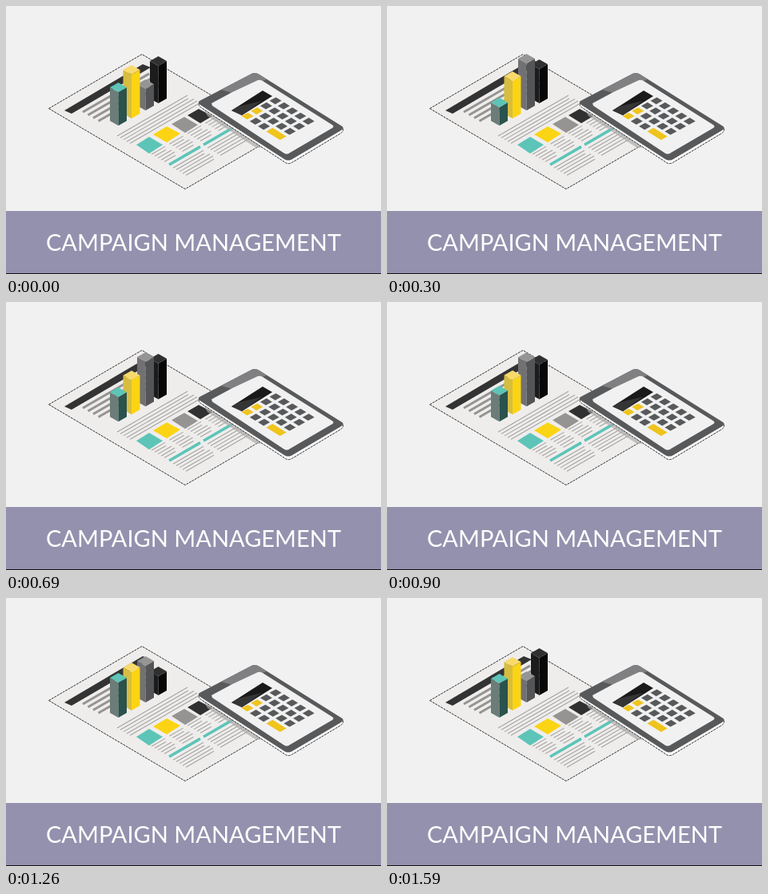
Recreate the animation shown at these times as an HTML page. Size 469x336 px, loop 1.62 s.

```html
<!DOCTYPE html>
<html lang="en">
<head>
<meta charset="utf-8">
<title>Campaign management</title>
<style>
html, body { margin: 0; width: 100%; height: 100%; overflow: hidden; background: #f1f1f1; }
svg { display: block; width: 469px; height: 336px; }
text { font: 29px Lato, "Open Sans", sans-serif; fill: #fff; text-anchor: middle; }
.edge { stroke: #333; stroke-width: 1; stroke-dasharray: 3 1; }
</style>
</head>
<body>
<svg viewBox="0 0 469 336">
  <path class="edge" fill="#efedec" d="M53.5 128.500L170 60.500L341 161.500L224 229.500Z"/>
  <path fill="#333" d="M73 131L171 73L181 77L82 135Z"/>
  <g id="print" fill="none"></g>
  <path fill="#5dc4b8" d="M163 174L179 164L196 174L179 185Z"/>
  <path fill="#fbd414" d="M184 161L201 151L218 160L201 171Z"/>
  <path fill="#959492" d="M207 148L223 139L240 149L224 159Z"/>
  <path fill="#303030" d="M227 137L241 129L258 138L243 147Z"/>
  <path fill="#aaa8a7" opacity=".65" d="M244 124L252 138L313 178L322 177Z"/>
  <path class="edge" fill="#fff" d="M241 122Q241 126 245 128L349 196Q353 199 358 196L418 160Q423 157 421 152L330 110Z"/>
  <path fill="#58595b" d="M242 119L305 86Q311 82 317 86L419 150Q424 153 419 156L358 192Q353 195 348 192L243 124Q239 121 242 119Z"/>
  <path fill="#808082" d="M269 105L305 86Q311 82 317 86L326 92L283 109Z"/>
  <path fill="#f1f1f1" d="M257 122L283 108L315 93Q318 92 321 94L408 149Q411 151 408 153L355 184Q351 187 347 184L258 125Z"/>
  <path fill="#1a1a1a" d="M282 131L321 106L333 113L295 137Z"/>
  <path fill="#353536" d="M282 131L290 126L320 119L295 137Z"/>
  <g id="keys"></g>
  <g id="bars"></g>
  <path fill="#9491ae" d="M0 257H469V335H0Z"/>
  <path fill="#111" d="M0 335H469V336H0Z"/>
  <text x="234.500" y="307">CAMPAIGN MANAGEMENT</text>
</svg>
<script>
const byId = id => document.getElementById(id);
const LOOP = 1620, STEP = 30, SLOPE = 0.58;

function add(parent, attrs) {
  const node = document.createElementNS('http://www.w3.org/2000/svg', 'path');
  for (const name in attrs) node.setAttribute(name, attrs[name]);
  return parent.appendChild(node);
}

// Parallel lines of print, running up to the right and stacked down to the right
function printLines(x, y, length, count, dx, stroke, width) {
  for (let i = 0; i < count; i++) {
    const run = length - (i % 3 === 1 ? 3 : 0);
    add(byId('print'), {
      d: `M${x + i * dx} ${y + i * dx * SLOPE}l${run} ${-run * SLOPE}`,
      stroke, 'stroke-width': width
    });
  }
}
const GRAY = '#a6a4a3', TEAL = '#5dc4b8';
printLines(96, 133, 83, 4, 6.5, '#959492', 3);
printLines(139, 163, 88, 5, 4, GRAY, 1.1);
for (let i = 0; i < 4; i++) printLines(182 + i * 22.5, 186 - i * 13, 17, 5, 4, GRAY, 1.1);
for (let i = 0; i < 2; i++) {
  const x = 204 + i * 43, y = 199 - i * 25;
  printLines(x, y, 39, 1, 0, TEAL, 3.5);
  printLines(x + 5, y + 4, 38, 5, 4, GRAY, 1.1);
}

// Calculator keys, the bottom left one twice as long
for (let row = 0; row < 5; row++) for (let col = 0; col < 4; col++) {
  if (row === 4 && col === 0) continue;
  const wide = row === 3 && col === 0;
  const at = (u, v) => `${302 + u * 11.7 + v * 10.3} ${138 - u * 6.4 + v * 6.4}`;
  const l = col - 0.34, r = col + 0.34, t = row - 0.34, b = row + (wide ? 1.34 : 0.34);
  const yellow = wide || (row === 0 && col < 2);
  add(byId('keys'), {
    d: `M${at(l, t)}L${at(r, t)}L${at(r, b)}L${at(l, b)}Z`,
    fill: yellow ? '#efc41c' : '#58595b'
  });
}

// Each bar: front edge, base, face colours (left, right, top), heights of the top as [ms, y]
const bars = [
  { x: 190.5, base: 122, fill: ['#1c1c1c', '#080808', '#303030'],
    top: [[0, 63], [300, 67], [540, 68], [690, 65], [780, 65], [1050, 71], [1260, 86], [1590, 63]] },
  { x: 174.5, base: 131, fill: ['#717173', '#545557', '#959595'],
    top: [[0, 92], [300, 60], [420, 52], [540, 57], [690, 63], [780, 63], [1050, 64], [1260, 73], [1590, 92]] },
  { x: 157, base: 141, fill: ['#d6bd40', '#fbd414', '#f8da6c'],
    top: [[0, 74], [300, 82], [540, 86], [690, 86], [780, 86], [1050, 85], [1260, 81], [1590, 74]] },
  { x: 140.5, base: 150, fill: ['#6c7c79', '#2b524c', '#5dc4b8'],
    top: [[0, 96], [300, 115], [540, 109], [690, 107], [780, 107], [1050, 100], [1260, 94], [1590, 95]] }
];
for (const bar of bars) bar.faces = bar.fill.map(fill => add(byId('bars'), { fill }));

// Smooth curve through the keys, level at turning points
function curve(keys, t) {
  const n = keys.length;
  const key = i => i < 0 ? [keys[i + n][0] - LOOP, keys[i + n][1]]
    : i < n ? keys[i] : [keys[i - n][0] + LOOP, keys[i - n][1]];
  let i = n - 1;
  while (keys[i][0] > t) i--;
  const slope = j => (key(j + 1)[1] - key(j)[1]) / (key(j + 1)[0] - key(j)[0]);
  const tangent = j => {
    const a = slope(j - 1), b = slope(j);
    return a * b > 0 ? 2 * a * b / (a + b) : 0;
  };
  const [t0, y0] = key(i), [t1, y1] = key(i + 1), span = t1 - t0, s = (t - t0) / span;
  return y0 + (y1 - y0) * s * s * (3 - 2 * s)
    + span * s * (1 - s) * (tangent(i) * (1 - s) - tangent(i + 1) * s);
}

function draw(now) {
  const t = Math.floor(now % LOOP / STEP) * STEP;
  for (const { x, base, top, faces } of bars) {
    const y = curve(top, t), w = 10.5, h = 6;
    const side = dx => `M${x} ${y + 2 * h}L${x + dx} ${y + h}V${base - h}L${x} ${base}Z`;
    faces[0].setAttribute('d', side(-w));
    faces[1].setAttribute('d', side(w));
    faces[2].setAttribute('d', `M${x} ${y}l${w} ${h}l${-w} ${h}l${-w} ${-h}Z`);
  }
}

const start = performance.now();
function tick() {
  draw(performance.now() - start);
  requestAnimationFrame(tick);
}
draw(0);
tick();
</script>
</body>
</html>
```
